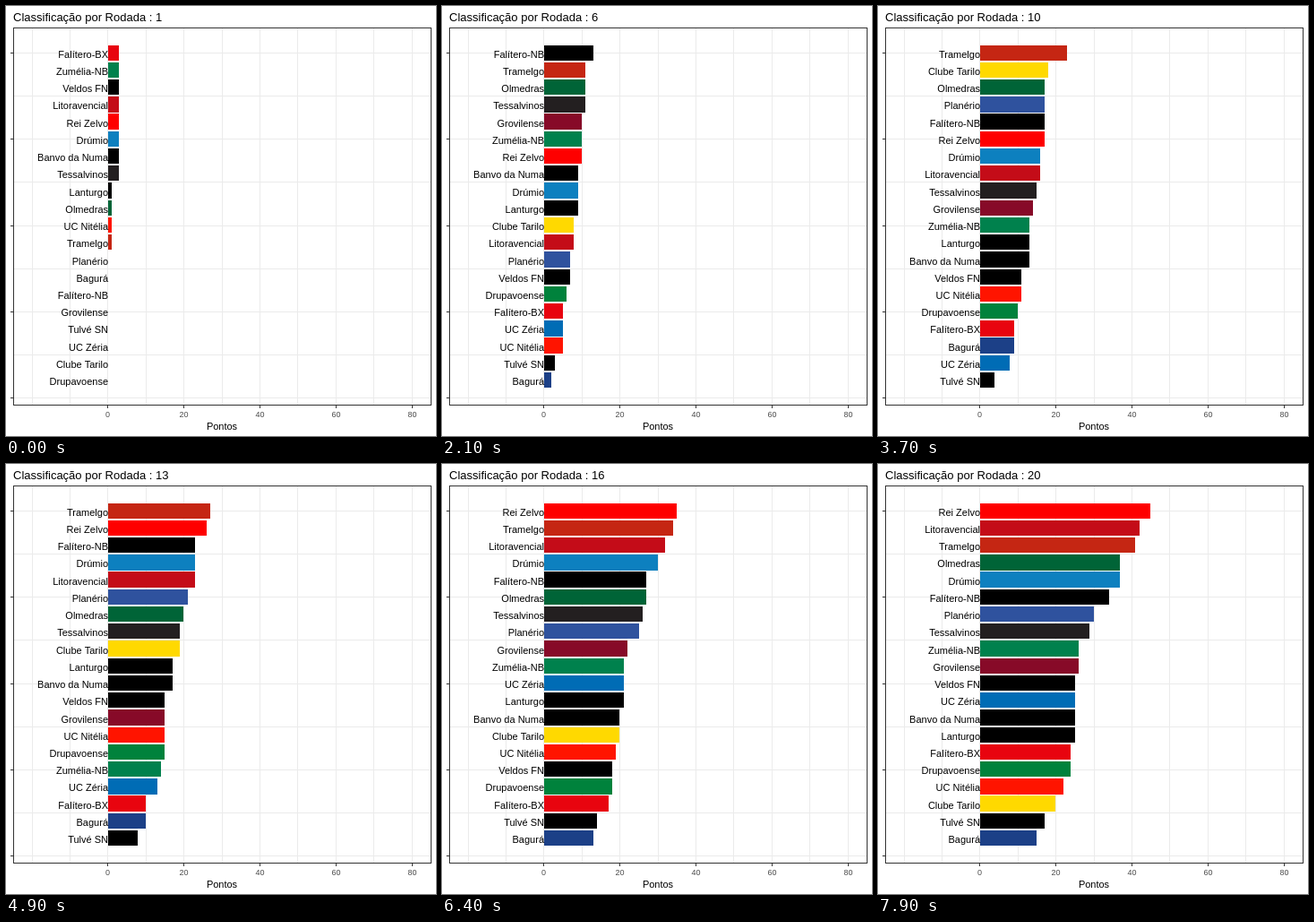
An HTML page with a canvas that plays this animation: 480x480 px, repeating every 8000 ms.

```html
<!DOCTYPE html>
<html lang="pt">
<head>
<meta charset="utf-8">
<style>
html, body { margin: 0; width: 100%; height: 100%; overflow: hidden; background: #fff; }
canvas { display: block; }
</style>
</head>
<body>
<canvas id="stage" width="480" height="480"></canvas>
<script>
const LOOP = 8000, STEP = 400;
const ctx = document.getElementById('stage').getContext('2d');

// Key, name, colour and results per round: W win, D draw, L loss
const teams = [
  ['a', 'Falítero-BX', '#e8040f', 'WDDLLLDWLLLLDLWWDDWLW'],
  ['b', 'Zumélia-NB', '#00814d', 'WLWLWDLLWLLDLLWWDLDWD'],
  ['c', 'Veldos FN', '#000000', 'WLDLWLLLWDLWDDDLDLWDW'],
  ['d', 'Litoravencial', '#c40c18', 'WLDLDWWWDDWWDWLWWWWWD'],
  ['e', 'Rei Zelvo', '#fe0000', 'WDDDDWWWLDWWWWLWWWWDW'],
  ['f', 'Drúmio', '#0d80bf', 'WDLWDDWDWLWDWLWDWWWDL'],
  ['g', 'Banvo da Numa', '#000000', 'WDDWLDLWLDWLDWLLLLDDW'],
  ['h', 'Tessalvinos', '#231f20', 'WWLDWDLWLDDLWLWWDLLLW'],
  ['i', 'Lanturgo', '#000000', 'DDWLWDLLWDDWLLWLDDLLW'],
  ['j', 'Olmedras', '#006437', 'DWDWLWLLWWDDDWLWDWWWD'],
  ['k', 'UC Nitélia', '#ff1400', 'DLLLWDWLLWDLWLWLDLLLW'],
  ['l', 'Tramelgo', '#c52613', 'DWWWLDWWWWWDLWDWLWLWD'],
  ['m', 'Planério', '#2f529e', 'LLDWWLWWWDLDWWLLDLDDW'],
  ['n', 'Bagurá', '#1c4087', 'LLLDLDDLWWLDLWLLLDLDL'],
  ['o', 'Falítero-NB', '#000000', 'LWWDWWLLDWWWLLWDLWWDL'],
  ['p', 'Grovilense', '#870a28', 'LWDWLWWDLLLLDWWLDLDWL'],
  ['q', 'Tulvé SN', '#000000', 'LDLDLDLLLDDLWLLWWDDDL'],
  ['r', 'UC Zéria', '#006cb5', 'LWDLDLWLLLDWDWWDDWDLL'],
  ['s', 'Clube Tarilo', '#ffd900', 'LDWWLDWWDWLDLLLLDLLLL'],
  ['t', 'Drupavoense', '#00823c', 'LDDDWLLWDLWDDDLDDWLWL']
].map(([key, name, color, results]) => ({ key, name, color, results }));

// Order among level teams, keyed by the first round it applies to
const tieOrders = {
  1: 'abcdefghijklmnopqrst',
  2: 'halbcdefjgoprimkqstn',
  4: 'lgjhfposbeaimdrctqkn',
  8: 'lehdpsmofgjbaitkrcnq',
  9: 'lsjmoefdhpbigcktanrq',
  12: 'leofdmjhsigcpktbranq',
  15: 'eldfojhmpbrigskctaqn',
  19: 'edljfomhbpcrgiatksqn'
};

const xAt = points => 113.5 + 4.24 * points;
const yAt = row => 52.2 + 19.23 * row;

function standings(round) {
  const order = tieOrders[Object.keys(tieOrders).filter(r => r <= round).pop()];
  const count = (team, letter) => team.results.slice(0, round).split(letter).length - 1;
  return teams.map(team => {
    const wins = count(team, 'W');
    return { ...team, wins, points: 3 * wins + count(team, 'D') };
  }).sort((a, b) => b.points - a.points || b.wins - a.wins ||
    order.indexOf(a.key) - order.indexOf(b.key));
}

const tables = Array.from({ length: 21 }, (_, i) => standings(i + 1));

function rect(color, x, y, w, h) {
  ctx.fillStyle = color;
  ctx.fillRect(x, y, w, h);
}

function text(string, x, y, size, align, color = '#000') {
  ctx.font = `${size}px "Liberation Sans", Arial, sans-serif`;
  ctx.textAlign = align;
  ctx.fillStyle = color;
  ctx.fillText(string, x, y);
}

function drawAxes() {
  rect('#fff', 0, 0, 480, 480);
  for (let p = -20; p <= 80; p += 10) {
    const x = Math.round(xAt(p) - 0.1);
    rect('#ebebeb', x, 25, 1, 420);
    if (p >= 0 && p % 20 === 0) {
      rect('#333', x, 446, 1, 3);
      text(p, x + 0.5, 459, 9, 'center', '#4d4d4d');
    }
  }
  for (let i = 0; i <= 8; i++) {
    const y = Math.round(yAt(i * 2.5));
    rect('#ebebeb', 9, y, 465, 1);
    if (i % 2 === 0) rect('#333', 5, y, 3, 1);
  }
  text('Pontos', 241, 473, 11, 'center');
}

function drawBars(table) {
  table.forEach(({ name, color, points }, row) => {
    const y = yAt(row);
    const top = Math.round(y - 8.65), bottom = Math.round(y + 8.65);
    if (points) rect(color, 114, top, Math.round(xAt(points)) - 114, bottom - top);
    text(name, 114, Math.round(y + 5.6), 11, 'right');
  });
}

function draw(now) {
  const t = now % LOOP;
  // The title follows the bars 100 ms later, except in the last rounds
  const round = t < 7900 ? 1 + Math.floor(t / STEP) : 21;
  const titleRound = t < 7600 ? 1 + Math.floor(Math.max(0, t - 100) / STEP) : 20;
  drawAxes();
  drawBars(tables[round - 1]);
  ctx.strokeStyle = '#333';
  ctx.strokeRect(8.5, 24.5, 466, 421);
  text(`Classificação por Rodada : ${titleRound}`, 8, 17, 13, 'left');
}

function tick() {
  draw(performance.now());
  requestAnimationFrame(tick);
}
tick();
</script>
</body>
</html>
```
